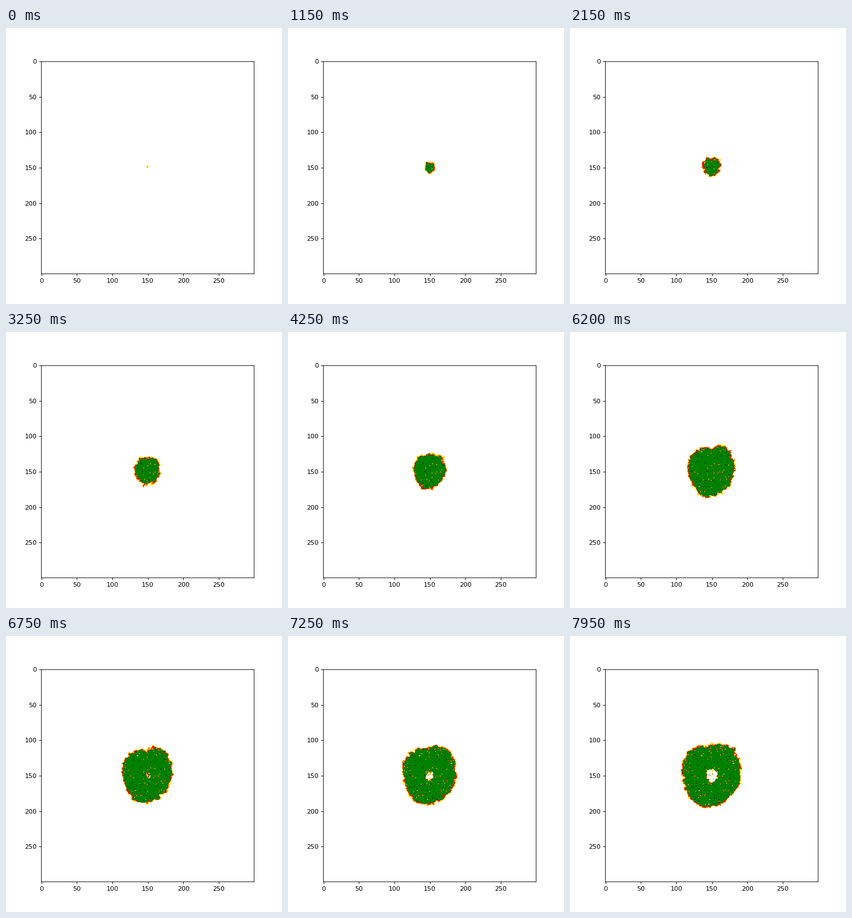
A matplotlib script that plays this animation: 480 px wide and 480 px high, repeating every 8000 ms.

```python
import numpy as np
import matplotlib.pyplot as plt
from matplotlib.animation import FuncAnimation
from matplotlib.colors import ListedColormap

N, FRAMES, INTERVAL = 300, 160, 50
WHITE, YELLOW, ORANGE, RED, GREEN, BLACK = range(6)
SPREAD = 0.5               # chance per step of catching it from a neighbour
IMMUNE = 134               # steps from exposure until immunity fades
SPEED = 0.262              # cells the front may advance per step

# Relative reach of the outbreak by direction, clockwise from the right
ANGLES = np.radians([0, 45, 112, 157, 225, 262, 310, 342])
REACH = [0.94, 0.91, 1.08, 0.92, 1.06, 0.97, 1.11, 0.94]

rng = np.random.default_rng(12)


def shifts(grid):
    """The grid moved to each of its nine neighbour places."""
    return [np.roll(grid, (sy, sx), (0, 1))
            for sy in (-1, 0, 1) for sx in (-1, 0, 1)]


def near(mask):
    return np.any(shifts(mask), axis=0)


def lumps(passes, size):
    noise = rng.normal(0, 1, (N, N))
    for _ in range(passes):
        noise = np.mean(shifts(noise), axis=0)
    return size * noise / noise.std()


rows, cols = np.mgrid[:N, :N]
dx, dy = cols - 149.8, rows - 149.5
reach = np.interp(np.arctan2(dy, dx), ANGLES, REACH, period=2 * np.pi)
distance = np.hypot(dx, dy) / reach + lumps(3, 1.1) + lumps(0, 0.5)

# End of each stage, counted from exposure
to_orange = rng.integers(1, 3, (N, N))
to_red = to_orange + rng.integers(1, 3, (N, N))
to_end = to_red + rng.integers(3, 6, (N, N))
to_white = IMMUNE + rng.normal(0, 2.5, (N, N))
dies = rng.random((N, N)) < 0.022
chance = np.where(rng.random((N, N)) < 0.02, 0.02, SPREAD)


def spread():
    """Step at which each cell is exposed."""
    start = np.full((N, N), np.inf)
    start[148:151, 149:152] = 0
    start[149, 149:151] = -4
    for step in range(1, FRAMES):
        age = step - start
        contagious = (age >= 1) & (age < to_end)
        caught = (np.isinf(start) & near(contagious)
                  & (distance <= 3 + SPEED * step)
                  & (rng.random((N, N)) < chance))
        start[caught] = step
    return start


exposed = spread()


def state(step):
    age = step - exposed
    over = age >= to_end
    stages = [(over & dies, BLACK), (age >= to_white, WHITE), (over, GREEN),
              (age >= to_red, RED), (age >= to_orange, ORANGE),
              (age >= 0, YELLOW)]
    return np.select(*zip(*stages), default=WHITE).astype(float)


cmap = ListedColormap(["white", "yellow", "orange", "red", "green", "black"])
fig, ax = plt.subplots(figsize=(6, 6), dpi=80)
image = ax.imshow(state(0), cmap=cmap, vmin=-0.5, vmax=5.5)


def update(step):
    image.set_data(state(step))
    return [image]


anim = FuncAnimation(fig, update, frames=FRAMES, interval=INTERVAL,
                     repeat=True, repeat_delay=0)
plt.show()
```
